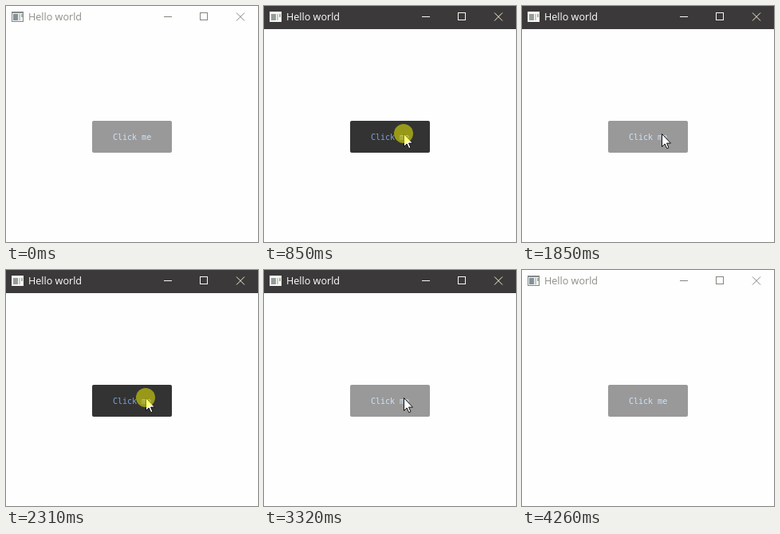
An HTML page for the animation above (4340 ms loop, 316 by 296 pixels).

```html
<!DOCTYPE html>
<html lang="en">
<head>
<meta charset="utf-8">
<title>Button press</title>
<style>
  html, body { margin: 0; width: 100%; height: 100%; overflow: hidden; background: #fefefe; }
  svg { display: block; width: 316px; height: 296px; }
  .title { font: 12.6px "Open Sans", "Noto Sans", sans-serif; }
  .label { font: 10px "DejaVu Sans Mono", "Liberation Mono", monospace; }
</style>
</head>
<body>
<svg viewBox="0 0 316 296" xmlns="http://www.w3.org/2000/svg">
  <rect width="316" height="296" fill="#fefefe"/>
  <rect id="bar" width="316" height="29"/>

  <g shape-rendering="crispEdges">
    <rect id="frame" x="7" y="7" width="15" height="13"/>
    <rect id="pane" x="8" y="9" width="13" height="10"/>
    <rect id="panel" x="9" y="10" width="6" height="8"/>
    <rect x="16" y="10" width="2" height="8" fill="#c3c9c6"/>
    <rect x="19" y="10" width="2" height="4" fill="#a9b3a2"/>
  </g>
  <text id="title" class="title" x="28" y="18">Hello world</text>

  <g id="controls" fill="none" stroke-width="1">
    <path d="M198 13.5H208"/>
    <rect x="243.5" y="8.5" width="9" height="9"/>
    <path id="close" d="M289 8.5L299 18.5M299 8.5L289 18.5"/>
  </g>

  <rect id="button" x="108" y="144" width="100" height="40" rx="2"/>
  <text id="label" class="label" x="134" y="168">Click me</text>

  <path id="cursor" d="M.5 .5V16.5L4.2 13L6.7 18.7L9 17.7L6.5 12.1H11.5Z"
        fill="#fff" stroke="#111" stroke-width="1"/>
  <circle id="halo" cx="175" cy="160" r="12" fill="#ff0" fill-opacity=".5"/>
</svg>
<script>
const LOOP = 4340;
const FOCUS = [850, 4260];
const PRESSES = [[850, 1160], [1620, 1850], [2310, 2540], [2920, 3320]];
const ENTER = { start: 230, end: 680, steps: 6 };
const LEAVE = { start: 3640, end: 4030, steps: 5 };
const REST = [175, 160], FROM = [213, 235], TO = [289, 277];

const el = id => document.getElementById(id);
const paint = (id, fill) => el(id).setAttribute("fill", fill);
const within = (t, [a, b]) => t >= a && t < b;
const mix = (a, b, k) => a.map((v, i) => Math.round(v + (b[i] - v) * k));

// The pointer is sampled at fixed intervals, so it moves in steps.
function stepAt(t, { start, end, steps }) {
  return Math.floor((t - start) / (end - start) * steps + 1e-6);
}

function pointerAt(t) {
  if (t < ENTER.start || t >= LEAVE.end) return null;
  if (t < ENTER.end) {
    const k = stepAt(t, ENTER) / ENTER.steps;
    return mix(FROM, REST, 1 - (1 - k) ** 2);
  }
  if (t < LEAVE.start) return REST;
  const k = (stepAt(t, LEAVE) + 1) / LEAVE.steps;
  return mix(REST, TO, k ** 1.5);
}

function draw(t) {
  const active = within(t, FOCUS);
  const pressed = PRESSES.some(span => within(t, span));

  paint("bar", active ? "#3b3939" : "#fefefe");
  paint("title", active ? "#fff" : "#908f88");
  paint("frame", active ? "#f4f4f0" : "#85888a");
  paint("pane", active ? "#fbfbf8" : "#f1f2f0");
  paint("panel", active ? "#959b99" : "#819298");
  el("controls").setAttribute("stroke", active ? "#f8f8f4" : "#85847d");
  el("close").setAttribute("stroke", active ? "#f3f3d4" : "#85847d");

  paint("button", pressed ? "#333" : "#999");
  paint("label", pressed ? "#7ba3dd" : "#cfe3fb");

  const tip = pointerAt(t);
  el("cursor").style.display = tip ? "" : "none";
  if (tip) el("cursor").setAttribute("transform", `translate(${tip})`);
  el("halo").style.display = pressed ? "" : "none";
}

const origin = performance.now();
function tick() {
  draw((performance.now() - origin) % LOOP);
  requestAnimationFrame(tick);
}
tick();
</script>
</body>
</html>
```
